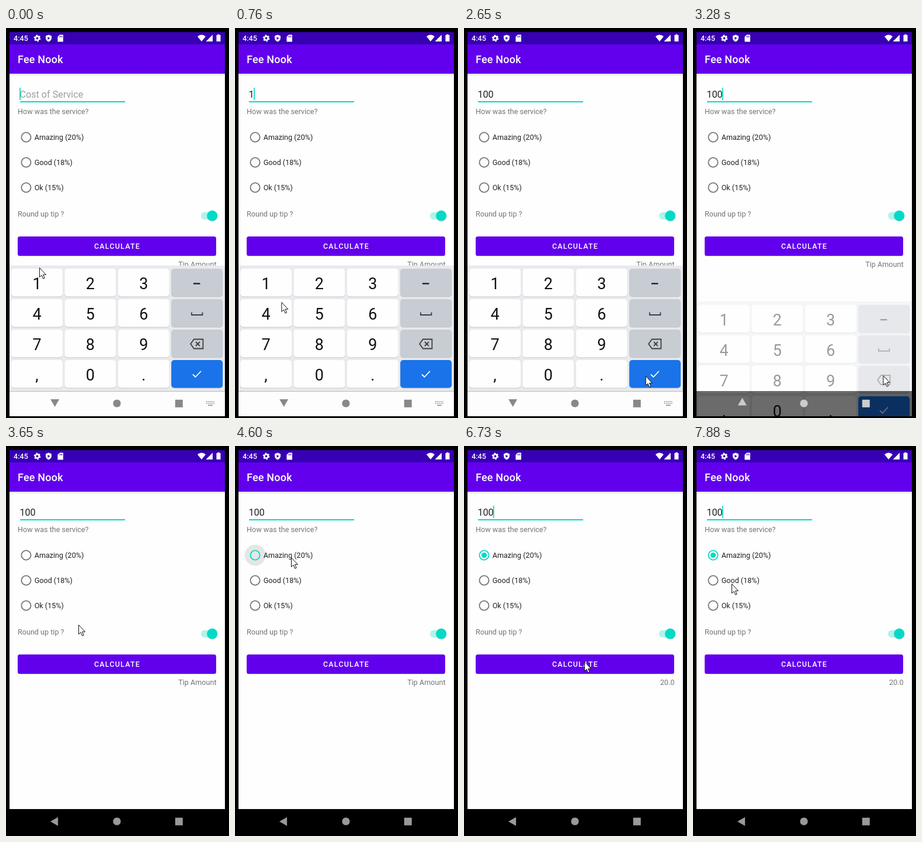
Write an HTML page that moves like this. It is 382 px wide and 666 px high and loops after 8000 ms.

```html
<!DOCTYPE html>
<html lang="en">
<head>
<meta charset="utf-8">
<title>Fee Nook</title>
<style>
html, body { margin: 0; width: 100%; height: 100%; overflow: hidden; background: #000; }
svg { display: block; font: 12.6px Roboto, sans-serif; }
.m { font-weight: 500; fill: #fff; }
.soft { fill: #757575; }
.dark { fill: #212121; }
.digit { font-size: 27px; text-anchor: middle; fill: #111; }
.ring { fill: none; stroke: #757575; stroke-width: 1.8; }
.line { fill: none; stroke: #3c4043; stroke-width: 1.8; }
.bold { stroke: #202124; stroke-width: 2.4; }
</style>
</head>
<body>
<svg width="382" height="666" viewBox="0 0 382 666">
  <defs>
    <clipPath id="screen"><rect x="6" y="7" width="369" height="656"/></clipPath>
    <clipPath id="button"><rect x="20" y="356" width="340" height="33" rx="3.6"/></clipPath>
    <linearGradient id="shade" x2="0" y2="1"><stop stop-color="#000" stop-opacity=".13"/><stop offset="1" stop-color="#000" stop-opacity="0"/></linearGradient>
  </defs>
  <g clip-path="url(#screen)">
    <rect x="6" y="78" width="369" height="542" fill="#fefefe"/>
    <rect x="6" y="78" width="369" height="4" fill="url(#shade)"/>
    <rect x="6" y="7" width="369" height="21" fill="#3700b3"/>
    <rect x="6" y="28" width="369" height="50" fill="#6200ee"/>

    <!-- status bar -->
    <text class="m" x="13" y="22">4:45</text>
    <g fill="#fff" transform="translate(0 -.5)">
      <circle cx="53.5" cy="18" r="3.2" fill="none" stroke="#fff" stroke-width="2.6"/>
      <circle cx="53.5" cy="18" r="5" fill="none" stroke="#fff" stroke-width="1.8" stroke-dasharray="2.6 2.636"/>
      <path d="M73 12l5 2v4q-.5 4-5 6-4.5-2-5-6v-4z"/>
      <path d="M71.5 15.5v5l4-2.5z" fill="#3700b3"/>
      <path d="M92 12h6v12h-9.5v-8.5z"/>
      <path d="M92 14v2.5M94 14v2.5M96 14v2.5" stroke="#3700b3"/>
      <path d="M328 15q7-6 14 0l-7 8.500z"/>
      <path d="M354 12v11.500h-11.500z"/>
      <path d="M360.500 12.500h2v-1.300h3v1.300h2v11h-7z"/>
    </g>
    <text class="m" x="20" y="60" font-size="18" letter-spacing=".2">Fee Nook</text>

    <!-- form -->
    <text id="field" x="23.400" y="119" font-size="16.200"></text>
    <rect x="24" y="125" width="180" height="2" fill="#03dac5"/>
    <rect id="caret" y="102" width="1.700" height="21" fill="#03dac5"/>
    <text class="soft" x="20" y="147">How was the service?</text>
    <circle id="halo" cx="34.500" cy="186.500" fill="#e6e6e6"/>
    <g id="radios"></g>
    <circle id="dot" cx="34.500" cy="186.500" fill="#03dac5"/>
    <text class="soft" x="20" y="322">Round up tip ?</text>
    <rect x="334" y="314.500" width="28" height="12.600" rx="6.300" fill="#b1f3ec"/>
    <circle cx="353.300" cy="321.500" r="9.200" opacity=".14"/>
    <circle cx="353.300" cy="320.600" r="9" fill="#03dac5"/>
    <rect x="20" y="357" width="340" height="33" rx="4" opacity=".16"/>
    <rect x="20" y="356" width="340" height="33" rx="3.600" fill="#6200ee"/>
    <g clip-path="url(#button)"><circle id="ripple" cx="204" cy="372.500" fill="#fff"/></g>
    <text class="m" x="151" y="377" letter-spacing="1.125">CALCULATE</text>
    <text id="tip" class="soft" x="360.500" y="408" text-anchor="end"></text>

    <!-- navigation bar and keyboard -->
    <rect x="6" y="620" width="369" height="43"/>
    <g id="board">
      <rect x="6" y="405.500" width="369" height="215" fill="#e8eaed"/>
      <rect x="6" y="620.500" width="369" height="43" fill="#fdfdfd"/>
      <g id="keys"></g>
      <path class="line bold" d="M321 436.500h11.500"/>
      <path class="line" d="M318 485.500v4.500h18.500v-4.500"/>
      <path class="line" d="M322 531.500h15.500v16h-15.500l-5.800-8zM325 536l7 7m0-7l-7 7"/>
      <path d="M320 591.500l4.500 4.500 9.500-10" fill="none" stroke="#fff" stroke-width="1.800"/>
      <path d="M343 638h14M343 641h14" stroke="#888" stroke-width="1.600" stroke-dasharray="1.700 1.300"/>
      <path d="M346 644.300h8" stroke="#888" stroke-width="1.500"/>
    </g>
    <g id="nav">
      <path id="back" d="M-8.700 0L4.400-7.500V7.500z"/>
      <circle cx="190" cy="641" r="6.600"/>
      <rect x="289.800" y="634.800" width="13" height="13" rx=".6"/>
    </g>
  </g>
  <path id="cursor" d="M.5.500V16.500l3.600-3.300 2.600 6 2.500-1.100-2.600-5.800h4.900z" fill="#fff" stroke="#111"/>
</svg>
<script>
const LOOP = 8000, TEAL = '#03dac5';
const $ = id => document.getElementById(id);
const set = (node, attrs) => { for (const k in attrs) node.setAttribute(k, attrs[k]); };
const ramp = (t, a, b) => Math.max(0, Math.min(1, (t - a) / (b - a)));
const mix = (a, b, p) => a + (b - a) * p;

$('radios').innerHTML = ['Amazing (20%)', 'Good (18%)', 'Ok (15%)'].map((label, i) => {
  const y = 186.5 + 43 * i;
  return `<circle class="ring" cx="34.5" cy="${y}" r="8.1"/><text class="dark" x="48.7" y="${y + 4.7}">${label}</text>`;
}).join('');

// Blank labels are the function keys in the last column
const labels = [...'123 456 789 ,0. '], DONE = 15;
$('keys').innerHTML = labels.map((label, i) => {
  const x = 9 + i % 4 * 91.4, y = 411 + (i >> 2) * 52;
  return `<rect x="${x}" y="${y + 1}" width="88" height="47.500" rx="5" opacity=".16"/>
    <rect class="key" x="${x}" y="${y}" width="88" height="47.500" rx="5"/>
    <text class="digit" x="${x + 44}" y="${y + 35}">${label}</text>`;
}).join('');
const keys = document.querySelectorAll('.key');
const firstRing = document.querySelector('.ring');

function keyColor(i, down) {
  if (i === DONE) return down ? '#1765cc' : '#1a73e8';
  return i % 4 === 3 ? '#c8ccd3' : down ? '#e2e2e2' : '#fefefe';
}

// Pointer moves: leave, arrive, x, y
const moves = [
  [150, 400, 60, 436],
  [650, 1200, 156, 594],
  [2150, 2700, 326, 594],
  [3280, 3650, 124, 305],
  [3850, 4330, 96, 190],
  [5000, 5650, 206, 368],
  [7000, 7370, 107, 256],
  [7650, 7880, 66, 235],
];
const typing = [600, 1700, 1980], picked = 4600;

function pointer(t) {
  let x = 57, y = 409;
  for (const [a, b, u, v] of moves) {
    const p = ramp(t, a, b);
    x = mix(x, u, p);
    y = mix(y, v, p);
  }
  return `translate(${x} ${y})`;
}

// The caret blinks once a second, starting over after each input
function caretOn(t) {
  const last = [0, ...typing, picked + 130].filter(k => k <= t).pop();
  return (t - last) % 1000 < 500;
}

function draw(t) {
  const typed = '100'.slice(0, typing.filter(k => k <= t).length);
  $('field').textContent = typed || 'Cost of Service';
  set($('field'), { fill: typed ? '#212121' : '#9e9e9e' });
  set($('caret'), { x: 23.2 + 8.9 * typed.length, opacity: +caretOn(t) });

  const held = t > 400 && t < 650 ? 0 : t > 1300 && t < 1980 ? 13 : t > 2800 && t < 3100 ? DONE : -1;
  keys.forEach((key, i) => set(key, { fill: keyColor(i, i === held) }));

  // Keyboard slides away while the back arrow turns
  const hide = ramp(t, 3150, 3375), turn = Math.min(1, hide * 1.15);
  set($('board'), { transform: `translate(0 ${106 * hide})`, opacity: 1 - hide });
  set($('back'), { transform: `translate(${mix(83.7, 84.7, turn)} ${mix(638.3, 641.2, turn)}) rotate(${mix(-90, 0, turn)})` });
  set($('nav'), { fill: hide === 0 ? '#888' : hide < 1 ? '#ccc' : '#999' });

  set($('halo'), { r: 18 * ramp(t, 4380, 4560), opacity: 1 - ramp(t, 4650, 4960) });
  firstRing.style.stroke = t < picked ? '' : TEAL;
  set($('dot'), { r: 4.6 * ramp(t, picked, picked + 250) });

  set($('ripple'), { r: 206 * ramp(t, 5830, 6030), opacity: .28 * (1 - ramp(t, 6080, 6320)) });
  $('tip').textContent = t < 6210 ? 'Tip Amount' : '20.0';
  set($('cursor'), { transform: pointer(t) });
}

const start = performance.now();
function frame() {
  draw((performance.now() - start) % LOOP);
  requestAnimationFrame(frame);
}
frame();
</script>
</body>
</html>
```
